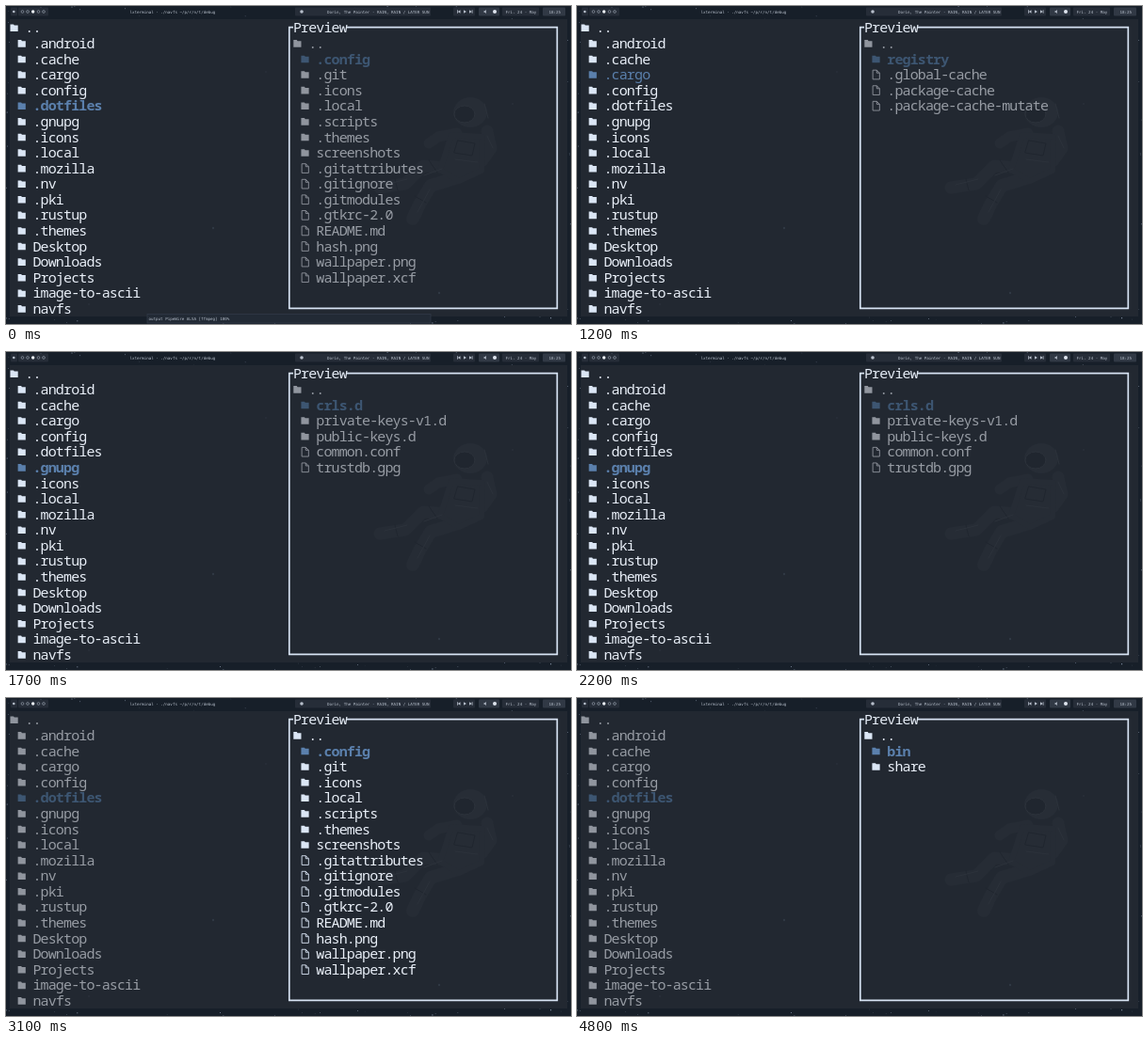
Animation of 600 by 338 pixels, one loop 5 s. Source, as an HTML page:

```html
<!DOCTYPE html>
<html lang="en">
<head>
<meta charset="utf-8">
<title>File navigator</title>
<style>
  html, body { margin: 0; width: 100%; height: 100%; overflow: hidden; background: #171f29; }
  svg { display: block; width: 600px; height: 338px; }
  .list { font: 15px "Noto Sans Mono", "DejaVu Sans Mono", monospace; letter-spacing: -0.87px; }
  .bar { font: 4.2px "DejaVu Sans Mono", "Liberation Mono", monospace; letter-spacing: 0; fill: #b7bfcb; }
</style>
</head>
<body>
<svg viewBox="0 0 600 338" xmlns="http://www.w3.org/2000/svg">
  <rect width="600" height="338" fill="#171f29"/>
  <g id="stars" fill="#8c99ad"></g>
  <rect x="4" y="14" width="592" height="316" fill="#222831"/>
  <g fill="#38414d" opacity=".7">
    <circle cx="220" cy="236" r="1.2"/><circle cx="460" cy="305" r="1.2"/>
    <circle cx="88" cy="317" r=".7"/><circle cx="276" cy="70" r=".7"/><circle cx="538" cy="104" r=".7"/>
  </g>

  <!-- faint astronaut behind the terminal -->
  <g fill="none" stroke="#262c35" stroke-linecap="round" stroke-linejoin="round">
    <path d="M479 135 459 139 449 146" stroke-width="11"/>
    <path d="M511 133 515 151 506 164" stroke-width="13"/>
    <path d="M472 172 443 170 424 189 397 193" stroke-width="13"/>
    <path d="M480 182 451 191 439 211 432 226" stroke-width="14"/>
    <path d="M473 137 506 139 505 175 481 186 461 174Z" fill="#262c35" stroke-width="6"/>
    <ellipse cx="493" cy="113" rx="18" ry="16" fill="#272d36" stroke="none"/>
    <ellipse cx="487" cy="115" rx="11" ry="9" fill="#20262f" stroke="#2c323b"/>
    <path d="M480 143 498 146 495 159 476 156ZM449 164 458 177M434 202 446 209M413 184 416 196" stroke="#20262f"/>
    <path d="M508 104 512 119M477 163 501 166M463 173 444 180M511 138 517 151M426 184 402 190M450 195 437 219" stroke="#2c323b"/>
  </g>

  <!-- status bar -->
  <g fill="#262d38">
    <rect x="5" y="1.5" width="7" height="9" rx="1"/>
    <rect x="13" y="1.5" width="32" height="9" rx="1"/>
    <rect x="307" y="1.5" width="144" height="9" rx="1"/>
    <rect x="475" y="1.5" width="23" height="9" rx="1"/>
    <rect x="502" y="1.5" width="22" height="9" rx="1" fill="#313945"/>
    <rect x="527" y="1.5" width="39" height="9" rx="1"/>
    <rect x="570" y="1.5" width="24" height="9" rx="1" fill="#313945"/>
  </g>
  <g fill="#b7bfcb">
    <circle cx="8.3" cy="6" r="1.3"/>
    <circle cx="28.7" cy="6" r="1.7" fill="#eef3fa"/>
    <g fill="none" stroke="#9fa8b5" stroke-width=".6">
      <circle cx="17.5" cy="6" r="1.4"/><circle cx="23" cy="6" r="1.4"/>
      <circle cx="34.5" cy="6" r="1.4"/><circle cx="40" cy="6" r="1.4"/>
    </g>
    <circle cx="314" cy="6" r="1.8"/>
    <path d="M482.5 4.2v3.6l-2.7-1.8zM479 4.2h.8v3.6H479zM486 4.2v3.6l3-1.8zM492 4.2v3.6l2.7-1.8zM494.7 4.2h.8v3.6h-.8z"/>
    <path d="M507.500 5.200h1l1.300-1.200v4l-1.300-1.200h-1z"/>
    <circle cx="519" cy="6" r="2" fill="#dfe5ef"/>
  </g>
  <g class="bar">
    <text x="131.500" y="7.600">lxterminal - ./navfs ~/p/r/n/t/debug</text>
    <text x="341" y="7.600">Dorin, The Painter - RAIN, RAIN / LATER SUN</text>
    <text x="530.500" y="7.600">Fri. 24 - May</text>
    <text x="576.500" y="7.600">18:25</text>
  </g>

  <path d="M305 22.700H300.800V321.300H585.300V22.700H362" fill="none" stroke="#d6e2f2" stroke-width="1.700"/>
  <g class="list">
    <text x="304.900" y="28.400" fill="#e6edf7">Preview</text>
    <g id="left"></g>
    <g id="right"></g>
  </g>

  <g id="notice">
    <rect x="150" y="327.500" width="301" height="9.500" fill="#222a35" stroke="#303946" stroke-width=".8"/>
    <text class="bar" x="151.500" y="333.500">output PipeWire ALSA [ffmpeg] 100%</text>
  </g>
</svg>
<script>
const LOOP = 5000, CELL = 8.13, ROW = 16.59;
const BRIGHT = { text: '#e9eff8', icon: '#dbe6f5', selected: '#5b80ad' };
const DIM = { text: '#979ca4', icon: '#90959e', selected: '#3d5672' };
const byId = id => document.getElementById(id);

const home = entries('.android .cache .cargo .config .dotfiles .gnupg .icons .local .mozilla .nv .pki ' +
  '.rustup .themes Desktop Downloads Projects image-to-ascii navfs');
const folders = {
  '.cargo': entries('registry', '.global-cache .package-cache .package-cache-mutate'),
  '.config': entries('alacritty bspwm dunst fish gtk-3.0 htop lxterminal mpv ncmpcpp nvim picom polybar ' +
    'pulse ranger rofi sxhkd'),
  '.dotfiles': entries('.config .git .icons .local .scripts .themes screenshots',
    '.gitattributes .gitignore .gitmodules .gtkrc-2.0 README.md hash.png wallpaper.png wallpaper.xcf'),
  '.gnupg': entries('crls.d private-keys-v1.d public-keys.d', 'common.conf trustdb.gpg'),
  '.icons': entries('Night-Cursors-Dark-Blue default'),
  '.local': entries('bin share')
};

// Each step: start time, home entry, focused pane, preview cursor, opened folder
const steps = [
  [0, '.dotfiles'], [200, '.config'], [500, '.cargo'], [1300, '.config'], [1500, '.dotfiles'],
  [1700, '.gnupg'], [1900, '.icons'], [2200, '.gnupg'], [2300, '.dotfiles'], [2500, '.config'],
  [2700, '.dotfiles'], [3100, '.dotfiles', 'right', 0], [3400, '.dotfiles', 'right', 1],
  [3600, '.dotfiles', 'right', 2], [3800, '.dotfiles', 'right', 3],
  [4800, '.dotfiles', 'right', 0, '.local']
];

function entries(dirs, files = '') {
  const list = (names, isFile) => names.split(' ').filter(Boolean).map(name => ({ name, isFile }));
  return [...list(dirs, false), ...list(files, true)];
}

function icon(x, base, isFile, color) {
  return isFile
    ? `<path transform="translate(${x + .4} ${base - 10.6})" d="M.8.6H5L8 3.600V10.300H.8ZM5 .6V3.600H8"
        fill="none" stroke="${color}" stroke-width=".9" stroke-linejoin="round"/>`
    : `<path transform="translate(${x + .5} ${base - 8.900})" d="M0 0H3.500L4.300 1.100H8.200V7.600H0Z" fill="${color}"/>`;
}

function line(x, row, { name, isFile }, theme, selected, bold) {
  const base = 28.4 + row * ROW;
  const pick = part => selected ? theme.selected : theme[part];
  return icon(x, base, isFile, pick('icon')) +
    `<text x="${x + 2 * CELL + .1}" y="${base}" fill="${pick('text')}" font-weight="${bold ? 700 : 400}">${name}</text>`;
}

function pane(x, top, items, cursor, theme) {
  return line(x, top, { name: '..' }, theme) + items.map((item, i) => {
    const selected = i === cursor;
    return line(x + CELL, top + 1 + i, item, theme, selected, selected && item.name !== '.cargo');
  }).join('');
}

function drawStars() {
  let seed = 17, out = '';
  const random = () => (seed = seed * 16807 % 2147483647) / 2147483647;
  const star = (x, y) => {
    out += `<circle cx="${x.toFixed(1)}" cy="${y.toFixed(1)}" r="${(.2 + random() * .4).toFixed(2)}"/>`;
  };
  for (let i = 0; i < 50; i++) star(random() * 600, i % 2 ? random() * 14 : 330 + random() * 8);
  for (let i = 0; i < 14; i++) star(random() * 4 + (i % 2 ? 0 : 596), 14 + random() * 316);
  byId('stars').innerHTML = out;
}

let shown = null;
function render(time) {
  const t = time % LOOP;
  byId('notice').style.display = t < 100 ? '' : 'none';
  const step = steps.findLast(([start]) => start <= t);
  if (step === shown) return;
  shown = step;
  const [, selected, focus = 'left', cursor = 0, opened = selected] = step;
  const homeCursor = home.findIndex(item => item.name === selected);
  byId('left').innerHTML = pane(4, 0, home, homeCursor, focus === 'left' ? BRIGHT : DIM);
  byId('right').innerHTML = pane(304.8, 1, folders[opened], cursor, focus === 'right' ? BRIGHT : DIM);
}

drawStars();
render(0);
const startTime = performance.now();
function tick() {
  render(performance.now() - startTime);
  requestAnimationFrame(tick);
}
requestAnimationFrame(tick);
</script>
</body>
</html>
```
